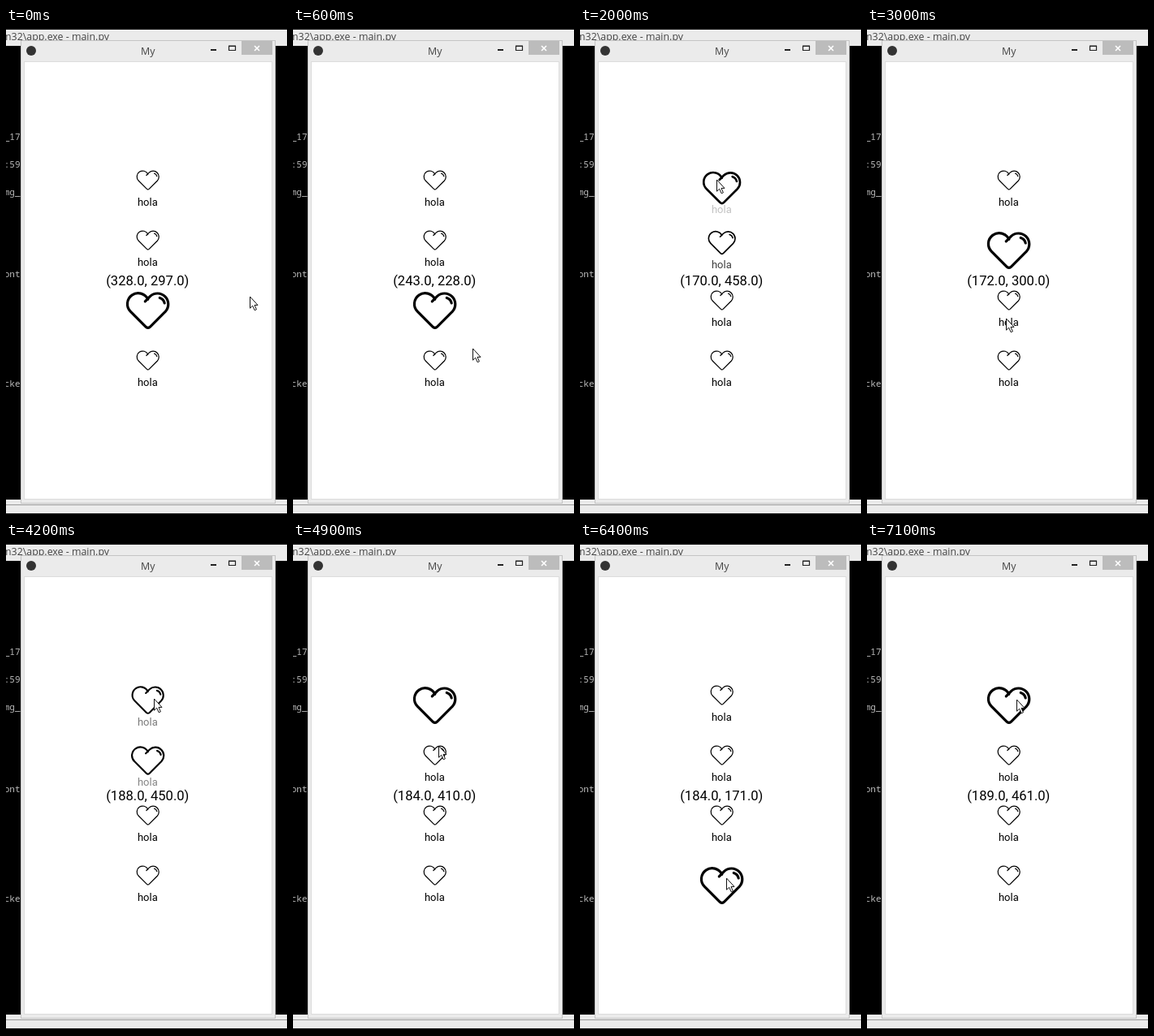
Write an HTML page that moves like this. It is 346 by 600 pixels and loops after 7.5 s.

```html
<!DOCTYPE html>
<html lang="es">
<head>
<meta charset="utf-8">
<style>
  html, body { margin: 0; width: 100%; height: 100%; overflow: hidden; background: #000; }
  svg { display: block; width: 346px; height: 600px; }
  text { font-family: Roboto, sans-serif; }
  .ui text { font-family: "Open Sans", "Noto Sans", sans-serif; font-size: 12.4px; fill: #444; }
  .log text { font: 11px "Noto Sans Mono", monospace; fill: #bbb; text-anchor: end; }
  .item text { font-size: 13px; text-anchor: middle; }
  .heart { fill: none; stroke: #000; stroke-linecap: round; stroke-linejoin: round; }
</style>
</head>
<body>
<svg viewBox="0 0 346 600">
  <defs>
    <path id="heart" d="M0 -13.7A13.3 13.3 0 1 0 -21.4 1.4L-2.5 20.3Q0 22.5 2.5 20.3L21.4 1.4A13.3 13.3 0 0 0 2.6 -17.4L-3.5 -11.2M14.5 -15.5A8.5 8.5 0 0 1 20.4 -9"/>
  </defs>
  <rect width="346" height="600" fill="#000"/>
  <g class="log">
    <text x="17.5" y="138">_17</text>
    <text x="17.5" y="172">:59</text>
    <text x="17.5" y="206">mg_</text>
    <text x="17.5" y="307">ont</text>
    <text x="17.5" y="442">cke</text>
  </g>
  <g class="ui">
    <rect y="2" width="346" height="20" fill="#ebebeb"/>
    <rect y="581" width="346" height="17" fill="#ebebeb"/>
    <rect y="587" width="346" height="1" fill="#999"/>
    <text x="127" y="15" text-anchor="end">m32\app.exe - main.py</text>
    <rect x="18.5" y="15.5" width="313" height="570" fill="#ebebeb" stroke="#c4c4c4"/>
    <rect x="22.5" y="41.5" width="305" height="539" fill="#fff" stroke="#dcdcdc"/>
    <circle cx="31" cy="28" r="6" fill="#333"/>
    <text x="174.7" y="33" text-anchor="middle">My</text>
    <rect x="252" y="26" width="7" height="2" fill="#222"/>
    <path d="M274.5 22.5h8v5h-8zM274 22h9" fill="none" stroke="#222" stroke-width="1.2"/>
    <rect x="290" y="16" width="38" height="17" fill="#bcbcbc"/>
    <path d="M306 22l6 6m0-6l-6 6" stroke="#fff" stroke-width="1.6"/>
  </g>
  <g id="list"></g>
  <text id="pos" x="174.3" y="317" font-size="16.6" text-anchor="middle"></text>
  <path id="cursor" d="M.5 0V14.2L3.7 11.2L6.2 16.8L8.4 15.8L6 10.4H10Z" fill="#fff" stroke="#111"/>
</svg>
<script>
const LOOP = 7500, STEP = 100, LAST = 7100;
const TEXT_LAG = 60, HOVER_LAG = 90, GROW = 250;
const SCALE = 0.839, LEFT = 25, BOTTOM = 580, PITCH = 74;

// Pointer turns and rests: time, x, y, with y measured up from the window bottom.
const path = [
  [0, 328, 297], [1000, 171, 170], [1140, 169, 231], [1940, 170, 458],
  [2040, 170, 476], [2400, 171, 476], [2940, 172, 300], [3250, 180, 119],
  [4140, 188, 450], [4260, 187, 475], [4600, 186, 475], [5540, 178, 219],
  [6350, 184, 170], [6850, 189, 461]
];

const $ = id => document.getElementById(id);
const clamp = (v, lo, hi) => Math.min(hi, Math.max(lo, v));
const mix = (a, b, k) => a + (b - a) * k;

function pointer(time) {
  const t = clamp(time, 0, path.at(-1)[0]);
  const n = Math.max(1, path.findIndex(p => p[0] >= t));
  const [t0, x0, y0] = path[n - 1], [t1, x1, y1] = path[n];
  const k = (t - t0) / (t1 - t0);
  return [mix(x0, x1, k), mix(y0, y1, k)];
}

// The rows tile the window upwards from the bottom of the fourth.
const ROW = PITCH / SCALE, LIST_TOP = 484;
const hovered = t => clamp(Math.floor((LIST_TOP - pointer(t)[1]) / ROW), 0, 3);

// Linear grow and shrink: the share of the last GROW ms spent over each row.
function growth(t) {
  const share = [0, 0, 0, 0], n = 25;
  for (let k = 0; k < n; k++) share[hovered(t - HOVER_LAG - (k + 0.5) * GROW / n)] += 1 / n;
  return share;
}

const row = '<g class="item"><use href="#heart" class="heart"/><text x="174.3">hola</text></g>';
$('list').innerHTML = row.repeat(4);
const items = [...$('list').children].map(g => g.children);

function draw(time) {
  const t = Math.min(LAST, Math.floor(time / STEP) * STEP);
  growth(t).forEach((p, i) => {
    const [heart, label] = items[i], top = i * PITCH;
    heart.setAttribute('transform',
      `translate(174.8 ${mix(187.5, 200, p) + top}) scale(${mix(0.537, 1, p)})`);
    heart.setAttribute('stroke-width', mix(2.3, 3.2, p));
    label.setAttribute('y', 218.5 + 13 * p + top);
    label.setAttribute('opacity', clamp(1 - p, 0, 1));
  });
  const [u, v] = pointer(t - TEXT_LAG).map(n => Math.round(n).toFixed(1));
  $('pos').textContent = `(${u}, ${v})`;
  const [x, y] = pointer(t);
  $('cursor').setAttribute('transform',
    `translate(${Math.round(LEFT + x * SCALE)} ${Math.round(BOTTOM - y * SCALE)})`);
}

const start = performance.now();
function tick() {
  draw((performance.now() - start) % LOOP);
  requestAnimationFrame(tick);
}
tick();
</script>
</body>
</html>
```
